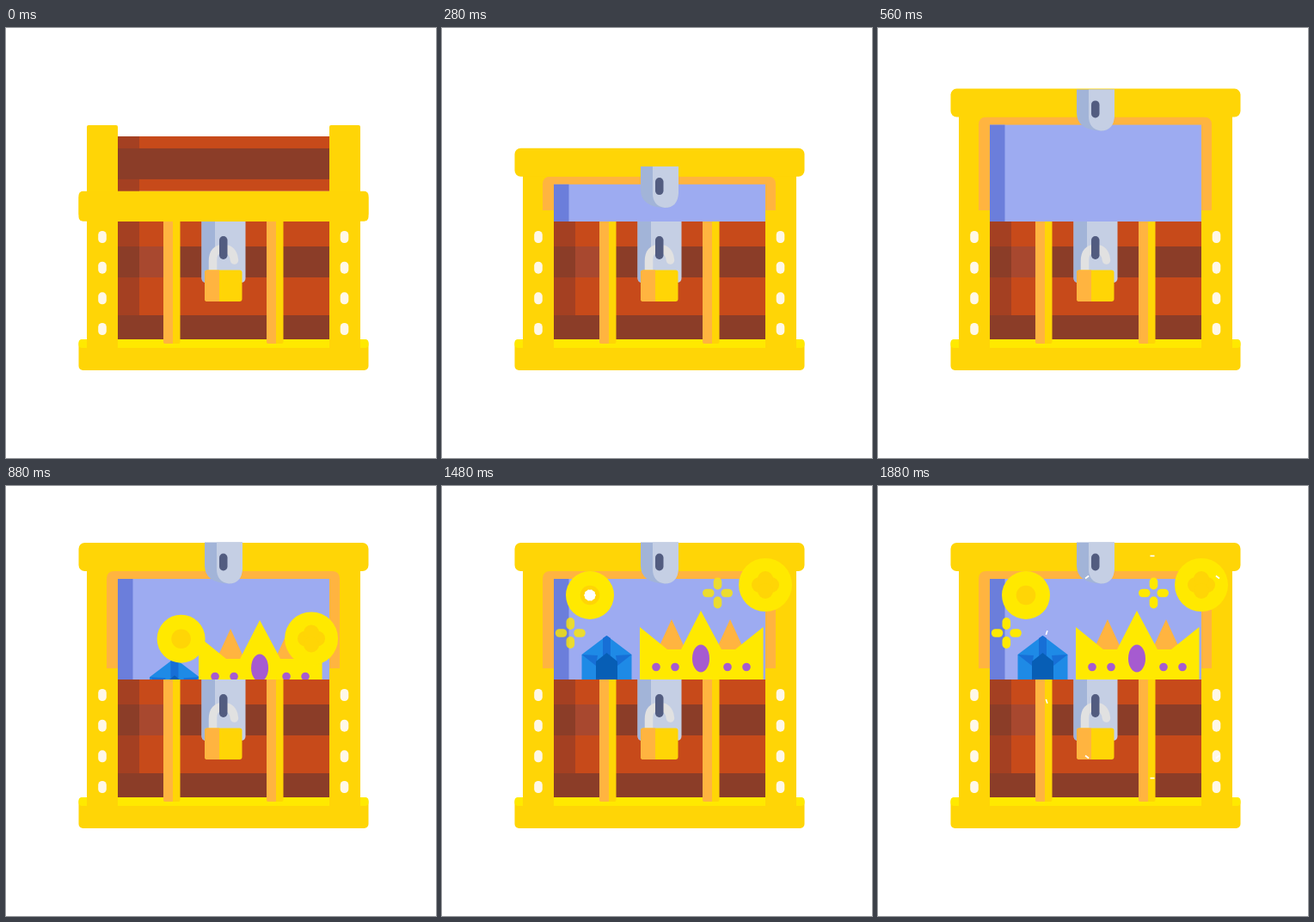
Animation, 500 px wide and 500 px high, one loop 1920 ms. Source, as an HTML page:

```html
<!DOCTYPE html>
<html lang="en">
<head>
<meta charset="utf-8">
<title>Treasure chest</title>
<style>
html, body { margin: 0; width: 100%; height: 100%; overflow: hidden; background: #fff; }
svg { display: block; width: 100vw; height: 100vh; }
</style>
</head>
<body>
<svg id="stage" viewBox="0 0 500 500"></svg>
<script>
const LOOP = 1920;
const C = {
  gold: '#ffd506', yellow: '#ffe900', orange: '#ffb440', white: '#fff8e7',
  red: '#c74a1a', redShade: '#a44022', brown: '#8b3d28', brownLight: '#a8482f',
  blue: '#9dabf1', blueShade: '#6b7edb', steel: '#c5cfe4', steelShade: '#a2b4d8',
  slot: '#525c80', purple: '#a65bd0'
};

const rect = (x, y, w, h, fill, r = 0) =>
  `<rect x="${x}" y="${y}" width="${w}" height="${Math.max(0, h)}" rx="${r}" fill="${fill}"/>`;
const circle = (x, y, r, fill) => `<circle cx="${x}" cy="${y}" r="${r}" fill="${fill}"/>`;
const poly = (points, fill) => `<polygon points="${points}" fill="${fill}"/>`;
const shape = (d, fill) => `<path d="${d}" fill="${fill}"/>`;
const group = (content, attrs) => `<g ${attrs}>${content}</g>`;
const move = (x, y) => `transform="translate(${x} ${y})"`;

const progress = (t, start, end) => Math.min(1, Math.max(0, (t - start) / (end - start)));
const easeSine = p => (1 - Math.cos(Math.PI * p)) / 2;
const easeCubic = p => p < 0.5 ? 4 * p ** 3 : 1 - 4 * (1 - p) ** 3;
const mix = (a, b, p) => a + (b - a) * p;

function closedLid(t) {
  const k = t / 160;
  const alpha = 1 - progress(t, 120, 280);
  if (!alpha) return '';
  const bar = 190 - 29 * k, top = 113 + 6 * k, h = Math.max(0, bar - 126);
  const edge = h * 14 / 64;
  return group(
    rect(130, 126, 246, h, C.red) + rect(130, 126, 25, h, C.redShade) +
    rect(130, 126 + edge, 246, h - 2 * edge, C.brown) +
    rect(94, top, 36, bar - top + 4, C.gold, 2) +
    rect(376, top, 36, bar - top + 4, C.gold, 2) +
    rect(84.5, bar, 337, 35, C.gold, 5), `opacity="${alpha}"`);
}

function openLid(t) {
  const p = easeSine(progress(t, 0, 640));
  const y = mix(190, 66, p), inner = y + 33;
  let out = rect(94, y + 20, 318, 215 - y, C.gold);
  if (inner < 212)
    out += shape(`M117 212V${inner + 9}Q117 ${inner} 126 ${inner}H379Q388 ${inner} 388 ${inner + 9}V212Z`, C.orange);
  out += rect(94, 212, 318, 20, C.gold);
  out += rect(130, inner + 9, 246, 216 - inner, C.blue) + rect(130, inner + 9, 17.5, 216 - inner, C.blueShade);
  return out + rect(84.5, y, 337, 33, C.gold, 7);
}

function hasp(t) {
  const y = mix(226, 65.5, easeSine(progress(t, 0, 640)));
  return group(
    shape('M0 0H44V27Q44 48 28 48Q0 47 0 27Z', C.steelShade) +
    shape('M14 0H44V31Q43 48 28 48Q14 46 14 31Z', C.steel) +
    rect(17, 13, 9.5, 20, C.slot, 4.7), move(231, y));
}

function crown() {
  return [267, 335].map(x => poly(`${x},155 ${x - 17},192 ${x + 17},192`, C.orange)).join('') +
    poly('230,164 262,190 278,190 301,145 325,190 341,190 373.5,164 373.5,245 230,245', C.yellow) +
    [249, 271, 332, 354].map(x => circle(x, 210.5, 4.8, C.purple)).join('') +
    `<ellipse cx="301" cy="200.5" rx="10" ry="16" fill="${C.purple}"/>`;
}

function gem() {
  const mid = '#176fd6';
  return poly('191.5,174 220.5,196 220.5,228 162.5,228 162.5,196', '#1e8ae6') +
    poly('191.5,174 187,177 187,197 196,197 196,177', mid) +
    poly('162.5,196 181,197 179,209', mid) + poly('220.5,196 202,197 204,209', mid) +
    poly('191.5,194 204,204 204,228 179,228 179,204', '#075eb5');
}

function flower() {
  return [[-7, 0], [7, 0], [0, -7], [0, 7]].map(([x, y]) => circle(x, y, 9, C.gold)).join('');
}

function treasure(t) {
  const left = (start, end) => 1 - easeSine(progress(t, start, end));
  const c = left(600, 960), g = left(640, 1120), k = left(600, 1080);
  if (t < 600) return '';
  return group(gem(), move(9 * g, 53 * g)) +
    group(crown(), move(-52 * c, 96 * c)) +
    group(circle(0, 0, 28, C.yellow) + circle(0, 0, 11.3, C.gold), move(172 + 86 * k, 127 + 138 * k)) +
    group(circle(0, 0, 31, C.yellow) + flower(), move(376 - 57 * k, 115 + 170 * k));
}

function sparkles(t) {
  const star = rect(-4.8, -18, 9.6, 14, C.yellow, 4.8) + rect(-4.8, 4, 9.6, 14, C.yellow, 4.8) +
    rect(-17.5, -4.8, 13.5, 9.6, C.yellow, 4.8) + rect(4, -4.8, 13.5, 9.6, C.yellow, 4.8);
  return group(group(star, move(149.3, 171)) + group(star, move(320.5, 124.5)),
    `opacity="${progress(t, 1160, 1560)}"`);
}

// Ten rays whose outer ends lead and inner ends follow.
function burst(t, x, y, start) {
  const reach = delay => 130 * easeCubic(progress(t, start + delay, start + delay + 313));
  const tip = reach(0), tail = reach(130);
  if (tip - tail < 0.05) return '';
  let rays = '';
  for (let i = 0; i < 10; i++)
    rays += `<path d="M0 ${-tail}V${-tip}" transform="rotate(${i * 36})"/>`;
  return group(rays, `${move(x, y)} stroke="#fff" stroke-width="5"`);
}

function body() {
  let out = rect(130, 225, 246, 140, C.red) + rect(130, 225, 25, 140, C.redShade);
  out += rect(130, 254, 246, 36, C.brown) + rect(155, 254, 28, 36, C.brownLight) +
    rect(130, 334, 246, 30, C.brown);
  out += rect(84.5, 362, 337, 36, C.gold, 5) + rect(84.5, 362, 337, 10, C.yellow, 4);
  for (const x of [94, 376]) out += rect(x, 225, 36, 150, C.gold);
  for (const x of [112, 393.5])
    for (const y of [243, 278.7, 314.3, 350]) out += rect(x - 4.8, y - 7, 9.6, 14, C.white, 4.6);
  for (const x of [183, 303])
    out += shape(`M${x} 225h19.5v140q0 2-2 2h-15.500q-2 0-2-2z`, C.gold) +
      shape(`M${x} 225h11v142h-9q-2 0-2-2z`, C.orange);
  out += shape('M227.500 225H278.500V291Q278.500 296 273 296H233Q227.500 296 227.500 291Z', C.steel) +
    shape('M227.500 225H243V296H233Q227.500 296 227.500 291Z', C.steelShade);
  out += `<path d="M240.500 284V271Q240.500 256.500 253 256.500Q264 257 265.500 270" fill="none" stroke="#e1e1e1" stroke-width="9.500" stroke-linecap="round"/>`;
  out += rect(248, 242, 9.5, 27, C.slot, 4.7);
  return out + rect(231, 281.5, 43.5, 36.5, C.gold, 3) +
    shape('M248 281.500H234Q231 281.500 231 284.500V315Q231 318 234 318H248Z', C.orange);
}

const stage = document.getElementById('stage');
const chestBody = body();

function draw(t) {
  stage.innerHTML = closedLid(t) + openLid(t) + hasp(t) + treasure(t) + sparkles(t) + chestBody +
    burst(t, 172, 127, 1409) + burst(t, 319, 210.5, 1484);
}

const begin = performance.now();
function tick() {
  draw((performance.now() - begin) % LOOP);
  requestAnimationFrame(tick);
}
tick();
</script>
</body>
</html>
```
